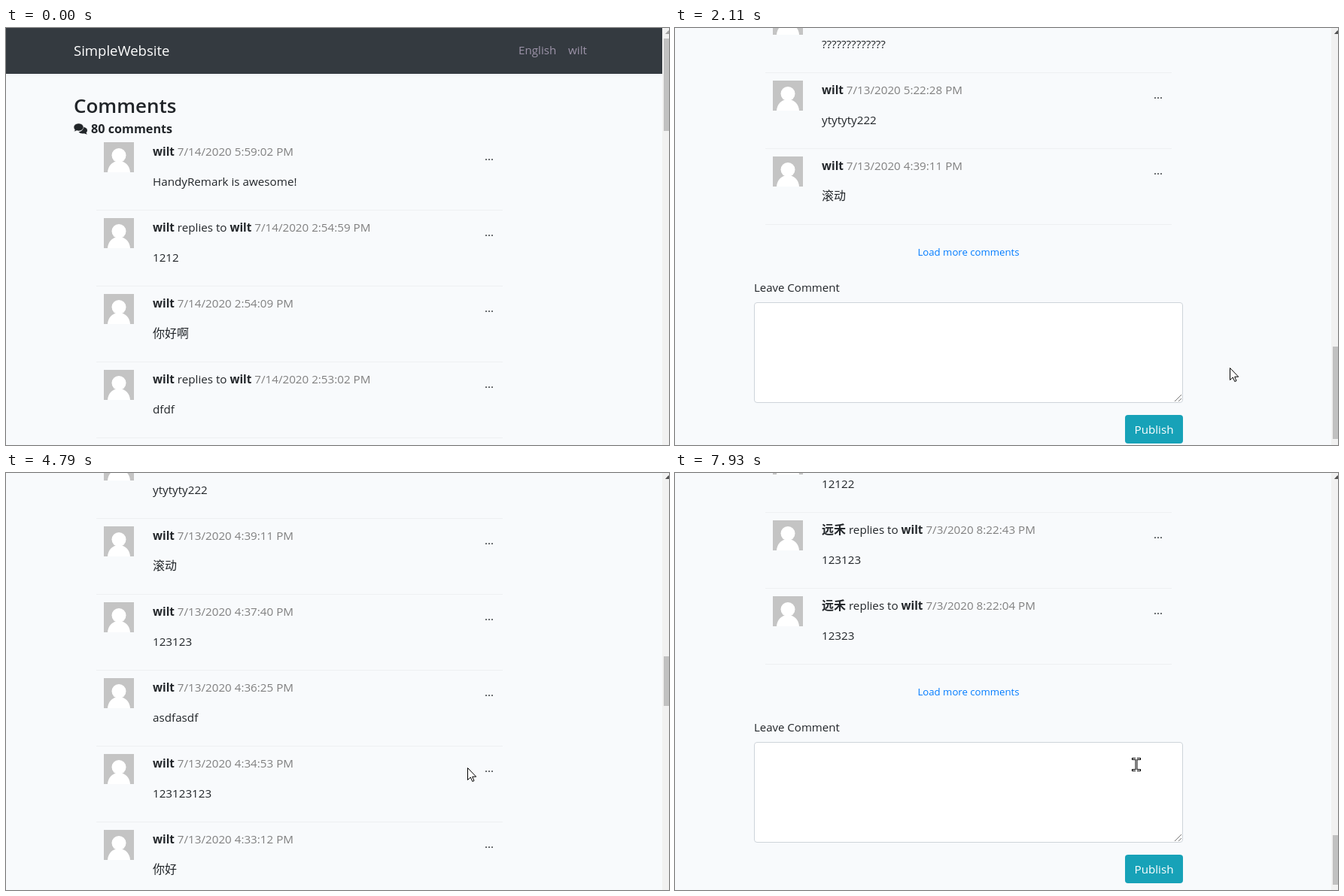
An HTML page for the animation above (8000 ms loop, 881 by 555 pixels).

```html
<!DOCTYPE html>
<html lang="en">
<head>
<meta charset="utf-8">
<title>Comments</title>
<style>
html, body { margin: 0; width: 100%; height: 100%; overflow: hidden; background: #f8fafc; }
#stage { position: relative; width: 881px; height: 555px; overflow: hidden; background: #f8fafc;
  color: #212529; font: 15.2px/24px "Open Sans", "Noto Sans CJK SC", "Noto Sans CJK", sans-serif; white-space: nowrap; }
#stage div, #stage svg, #stage h2 { position: absolute; margin: 0; }
#page { left: 0; top: 0; width: 872px; }
.nav { left: 0; top: 0; width: 872px; height: 61px; background: #343a40; box-shadow: 0 2px 4px rgba(0,0,0,.04); color: #9c93a8; }
.brand { left: 90px; top: 15px; font-size: 18.5px; line-height: 30px; color: #fff; }
h2 { left: 90px; top: 86px; font-size: 26px; line-height: 34px; font-weight: 600; }
b { font-weight: 700; }
.count { left: 113px; top: 122px; font-size: 16.2px; font-weight: 700; }
.han { font-size: 16px; line-height: 0; }
.row { left: 120px; width: 540px; box-sizing: border-box; border-bottom: 1px solid #eef0f2; }
.row svg { left: 10px; top: 10px; }
.row div { left: 75px; }
.row .more { left: 516px; top: 16px; }
time { color: #808080; }
#foot { left: 105px; width: 570px; }
#link { left: 0; width: 570px; top: 24px; text-align: center; font-size: 13.2px; color: #007bff; }
#link.hover { color: #0056b3; text-decoration: underline; }
.label { left: 0; top: 71px; font-size: 15px; }
.area { left: 0; top: 103px; width: 568px; height: 132px; background: #fff; border: 1px solid #ced4da; border-radius: 4px; }
.area svg { right: 1px; bottom: 1px; }
.button { left: 493px; top: 253px; width: 77px; height: 38px; line-height: 38px; border-radius: 4px; background: #17a2b8; color: #fff; text-align: center; }
.track { left: 872px; top: 0; width: 9px; height: 555px; background: #f1f1f1; }
#thumb { left: 2px; width: 7px; background: #c1c1c1; }
#glow { left: -13px; top: -13px; width: 25px; height: 25px; border-radius: 50%; background: rgba(255,255,0,.5); }
#cursor svg { overflow: visible; left: 0; top: 0; }
</style>
</head>
<body>
<div id="stage">
  <div id="page">
    <div class="nav">
      <div class="brand">SimpleWebsite</div>
      <div style="left:681px;top:17px">English</div>
      <div style="left:747px;top:17px">wilt</div>
    </div>
    <h2>Comments</h2>
    <svg style="left:90px;top:127px" width="19" height="15" fill="#212529">
      <path d="M12 4.5C16 5 18 7 18 9.2c0 1.300-.7 2.300-1.500 3 .3 1 1 1.700 1.500 2.300-1.700 0-3-.5-4-1.200-3 .6-6-.2-7.500-2C10.500 11 13 8 12 4.500Z"/>
      <path d="M6.500 0C10.200 0 13 2.200 13 5s-2.800 5-6.500 5c-1 0-1.800-.1-2.600-.4C2.900 10.300 1.700 10.800 0 10.800c.6-.6 1.200-1.400 1.500-2.400C.6 7.500 0 6.300 0 5 0 2.200 2.800 0 6.500 0Z" stroke="#f8fafc" stroke-width=".6"/>
    </svg>
    <div class="count">80 comments</div>
    <div id="list"></div>
    <div id="foot">
      <div id="link">Load more comments</div>
      <div class="label">Leave Comment</div>
      <div class="area"><svg width="9" height="9" stroke="#777"><path d="M0 9 9 0M5 9 9 5"/></svg></div>
      <div class="button">Publish</div>
    </div>
  </div>
  <div class="track">
    <svg width="9" height="14"><path id="up" d="M4 8 8.500 3 13 8Z"/></svg>
    <div id="thumb"></div>
  </div>
  <div id="cursor">
    <div id="glow"></div>
    <svg data-kind="arrow" width="13" height="20"><path d="M.5.5V16.500L4.300 13 6.800 18.500 9 17.600 6.700 12.200H11.700Z" fill="#fff" stroke="#000"/></svg>
    <svg data-kind="hand" width="17" height="23"><path d="M-.5 1.500C-.5 0 2.500 0 2.500 1.500V7C3 6 5 6.200 5.200 7.500 6 6.500 8 7 8 8.300 9 7.600 10.500 8.300 10.500 9.700V14.500C10.500 17 9 18 9 21.500H.5C.5 19-2 17.500-4.500 13.500-6 11.300-4 10-2.500 11.500L-.5 13.500Z" fill="#fff" stroke="#000"/><path d="M2.500 7V11M5.200 8V11M8 9V11" fill="none" stroke="#000"/></svg>
    <svg data-kind="beam" width="1" height="1" fill="none"><path d="M-6-7.500H-1M1-7.500H6M-6 7.500H-1M1 7.500H6M0-7V7" stroke="#000" stroke-width="3"/><path d="M-5-7.500H-1M1-7.500H5M-5 7.500H-1M1 7.500H5M0-7V7" stroke="#fff"/></svg>
  </div>
</div>
<script>
const LOOP = 8000, LOADED_AT = 4110, FIRST_PAGE = 20;
const $ = id => document.getElementById(id);

// [>reply] day time|paragraphs|author|recipient; all in July, PM
const comments = `14 5:59:02|HandyRemark is awesome!
>14 2:54:59|1212
14 2:54:09|你好啊
>14 2:53:02|dfdf
14 2:51:37|123123
>14 2:48:20|asdf
14 2:47:15|1231
>13 7:12:46|5656
13 7:09:31|232323
13 7:08:22|676767
>13 7:07:14|工
13 7:07:03|123123123123111
>13 6:59:50|123123
13 6:36:19|1234
13 6:33:43|阿斯蒂芬
13 6:31:08|123123
13 5:48:52|asdfasdf
13 5:25:16|?????????????
13 5:22:28|ytytyty222
13 4:39:11|滚动
13 4:37:40|123123
13 4:36:25|asdfasdf
13 4:34:53|123123123
13 4:33:12|你好
13 4:31:47|1231
13 4:30:06|我来了!/123
13 4:28:49|我来了!/我来了!/123
13 4:23:52|asdfasdfasdfasdfasdfasdf
13 4:22:33|123123123123123
13 4:21:46|aasdfas123123123
13 4:18:23|123123
13 4:16:35|asdfasdf
4 5:24:09|123123
4 5:23:27|123123asdfzzzzzzzzz
4 5:23:01|hahahah
4 5:21:50|123123
4 4:05:22|asdfsadf
>3 8:25:50|12122|远禾|owner
>3 8:22:43|123123|远禾
>3 8:22:04|12323|远禾`.split("\n");

const scrollSteps = [
  [0, 0], [150, 100], [230, 200], [310, 300], [390, 500], [470, 600],
  [720, 700], [790, 800], [850, 900],
  [1020, 1000], [1090, 1100], [1190, 1200], [1250, 1400],
  [1480, 1600], [1550, 1800], [1630, 1900],
  [4730, 2000], [4800, 2100], [4880, 2200],
  [5110, 2400], [5200, 2600], [5280, 2700], [5600, 2800], [5670, 2900],
  [5980, 3000], [6060, 3100], [6140, 3200], [6210, 3300],
  [6760, 3600], [6850, 3700], [6910, 3800], [7370, 4000], [7450, 4071]
];

const pointerPath = [
  [0, 900, 540, "arrow"], [230, 840, 530, "arrow"], [470, 785, 463, "arrow"],
  [1250, 785, 463, "arrow"], [1480, 786, 459, "arrow"], [2035, 786, 459, "arrow"],
  [2110, 737, 452, "arrow"], [2260, 660, 420, "beam"], [2640, 440, 375, "beam"],
  [2785, 400, 342, "arrow"], [2860, 389, 331, "arrow"],
  [2940, 392, 385, "beam"], [3020, 396, 438, "beam"], [3180, 400, 395, "beam"],
  [3260, 396, 335, "arrow"], [3340, 388, 258, "arrow"], [3410, 385, 246, "arrow"],
  [3560, 388, 262, "arrow"], [3720, 388, 290, "hand"], [3800, 389, 294, "hand"],
  [4110, 389, 294, "arrow"], [4340, 500, 350, "arrow"], [4490, 540, 365, "arrow"],
  [4650, 613, 392, "arrow"], [6685, 613, 392, "arrow"], [6760, 612, 388, "arrow"],
  [7370, 613, 388, "arrow"], [7930, 613, 388, "beam"], [LOOP, 613, 388, "beam"]
];

const han = text => text.replace(/[\u4e00-\u9fff]+/g, "<span class='han'>$&</span>");
const avatar = `<svg width="40" height="40"><path d="M0 0H40V40H0Z" fill="#c4c4c4"/>
  <g fill="#fff"><circle cx="20" cy="17.500" r="9.500"/><path d="M5 40C5.500 32 11 25 20 25S34.500 32 35 40Z"/></g></svg>`;

let bottom = 142, firstEnd;
const rows = comments.map((line, i) => {
  const [head, body, author = "wilt", to = "wilt"] = line.split("|");
  const [day, clock] = head.replace(">", "").split(" ");
  const paragraphs = body.split("/");
  const reply = head[0] === ">" ? ` replies to <b>${to}</b>` : "";
  const row = document.createElement("div");
  const height = 53 + 48 * paragraphs.length;
  row.className = "row";
  row.style.cssText = `top:${bottom}px;height:${height}px`;
  row.innerHTML = avatar +
    `<div style="top:10px"><b>${han(author)}</b>${reply} <time>7/${day}/2020 ${clock} PM</time></div>` +
    paragraphs.map((p, n) => `<div style="top:${50 + 48 * n}px">${han(p)}</div>`).join("") +
    `<div class="more">...</div>`;
  $("list").append(row);
  bottom += height;
  if (i + 1 === FIRST_PAGE) firstEnd = bottom;
  return row;
});

const lastIndex = (table, t) => table.findLastIndex(step => step[0] <= t);

function pointerAt(t) {
  const i = lastIndex(pointerPath, t);
  const [t0, x0, y0, kind] = pointerPath[i];
  const [t1, x1, y1] = pointerPath[i + 1];
  const k = Math.floor((t - t0) / 75) * 75 / (t1 - t0);
  return { x: Math.round(x0 + (x1 - x0) * k), y: Math.round(y0 + (y1 - y0) * k), kind };
}

function draw(t) {
  const loaded = t >= LOADED_AT;
  const scroll = scrollSteps[lastIndex(scrollSteps, t)][1];
  const pointer = pointerAt(t);

  $("page").style.transform = `translateY(${-scroll}px)`;
  rows.forEach((row, i) => row.style.display = loaded || i < FIRST_PAGE ? "" : "none");
  $("foot").style.top = (loaded ? bottom : firstEnd) + "px";
  $("link").className = pointer.kind === "hand" ? "hover" : "";

  $("thumb").style.top = Math.round(14 + scroll * (loaded ? 0.115 : 0.2158)) + "px";
  $("thumb").style.height = (loaded ? 66 : 123) + "px";
  $("up").setAttribute("fill", scroll ? "#505050" : "#a3a3a3");

  $("cursor").style.transform = `translate(${pointer.x}px,${pointer.y}px)`;
  for (const shape of document.querySelectorAll("[data-kind]"))
    shape.style.display = shape.dataset.kind === pointer.kind ? "" : "none";
  $("glow").style.display = t >= 3800 && t < 4030 ? "" : "none";
}

const start = performance.now();
function tick() {
  draw((performance.now() - start) % LOOP);
  requestAnimationFrame(tick);
}
tick();
</script>
</body>
</html>
```
